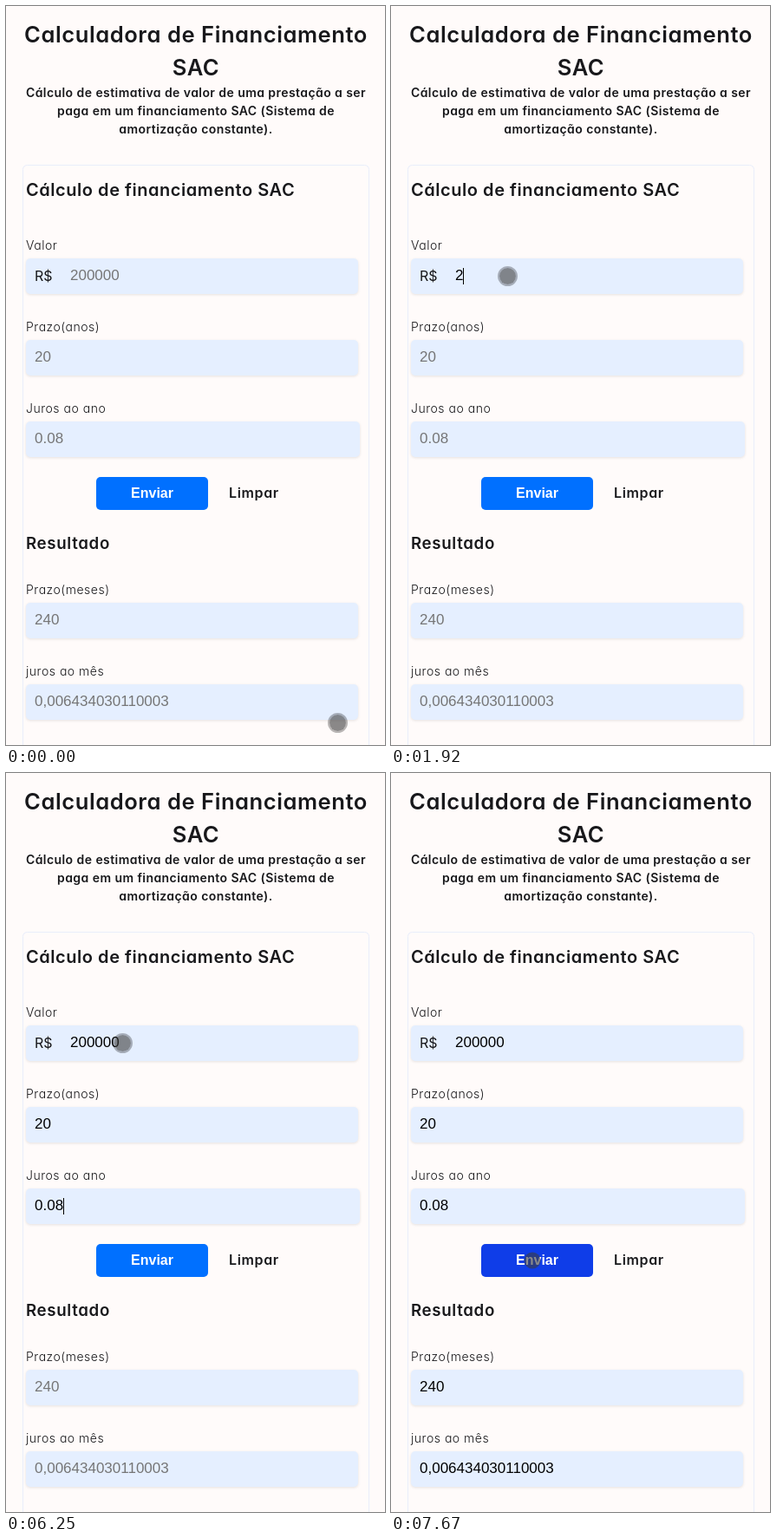
Animation, 437 px wide and 852 px high, one loop 8000 ms. Source, as an HTML page:

```html
<!DOCTYPE html>
<html lang="pt">
<head>
<meta charset="utf-8">
<title>Calculadora de Financiamento SAC</title>
<style>
  html, body { margin: 0; width: 100%; height: 100%; overflow: hidden; background: #fffbfa; }
  svg { display: block; width: 437px; height: 852px; }
  text {
    font-family: Inter, "Open Sans", sans-serif; font-weight: 600; fill: #18181b;
    font-optical-sizing: none; font-feature-settings: "cv11"; letter-spacing: .027em;
  }
  .title { font-size: 25.6px; text-anchor: middle; letter-spacing: .021em; }
  .sub { font-size: 14px; text-anchor: middle; letter-spacing: .031em; }
  .h2 { font-size: 20px; }
  .h3 { font-size: 18.72px; letter-spacing: .035em; }
  .label { font-size: 14px; font-weight: 350; letter-spacing: .037em; }
  .prefix { font-size: 16px; font-weight: 400; letter-spacing: 0; }
  .limpar { font-size: 16px; letter-spacing: .04em; }
  .value, .enviar {
    font-family: "Liberation Sans", Arial, sans-serif; letter-spacing: 0; font-feature-settings: normal;
  }
  .value { font-size: 17px; font-weight: 400; }
  .enviar { font-size: 16px; font-weight: 700; fill: #fff; text-anchor: middle; }
  .field { fill: #e5efff; filter: drop-shadow(0 1px 1.5px rgba(0, 0, 0, .1)); }
</style>
</head>
<body>
<svg viewBox="0 0 437 852">
  <rect x="19.5" y="183.5" width="399" height="700" rx="5" fill="none" stroke="#e8eefa"/>
  <text class="title" x="219" y="42">Calculadora de Financiamento</text>
  <text class="title" x="219" y="80">SAC</text>
  <text class="sub" x="219" y="105">Cálculo de estimativa de valor de uma prestação a ser</text>
  <text class="sub" x="219" y="126">paga em um financiamento SAC (Sistema de</text>
  <text class="sub" x="219" y="147">amortização constante).</text>
  <text class="h2" x="23" y="219">Cálculo de financiamento SAC</text>
  <g id="fields"></g>
  <text class="prefix" x="33" y="317">R$</text>
  <rect id="button" x="104" y="543" width="129" height="38" rx="5"/>
  <text class="enviar" x="168.5" y="567">Enviar</text>
  <text class="limpar" x="257" y="567">Limpar</text>
  <text class="h3" x="23" y="626">Resultado</text>
  <rect id="caret" width="1" height="19"/>
  <g id="cursor">
    <circle r="9.5" fill="#3c3c3c" fill-opacity=".6"/>
    <circle id="ring" r="10.5" fill="none" stroke="#000" stroke-opacity=".28" stroke-width="2"/>
  </g>
</svg>
<script>
const LOOP = 8000, BLINK = 530, RESULT_AT = 7530;
const $ = id => document.getElementById(id);

function add(tag, attrs, text = '') {
  const el = document.createElementNS('http://www.w3.org/2000/svg', tag);
  for (const key in attrs) el.setAttribute(key, attrs[key]);
  el.textContent = text;
  $('fields').append(el);
  return el;
}

const fields = [
  ['Valor', 291, '200000', 74],
  ['Prazo(anos)', 385, '20', 33],
  ['Juros ao ano', 479, '0.08', 33, 385],
  ['Prazo(meses)', 688, '240', 33],
  ['juros ao mês', 782, '0,006434030110003', 33]
].map(([label, top, hint, x, width = 383]) => {
  add('text', { class: 'label', x: 23, y: top - 10 }, label);
  add('rect', { class: 'field', x: 23, y: top, width, height: 41, rx: 5 });
  return { top, hint, x, el: add('text', { class: 'value', x, y: top + 25 }) };
});

// time, focused field, typed text
const typing = [
  [0, -1, ''], [990, 0, ''],
  [1920, 0, '2'], [2380, 0, '20'], [2580, 0, '200'],
  [3050, 0, '2000'], [3170, 0, '20000'], [3370, 0, '200000'],
  [3570, 1, ''], [4200, 1, '2'], [4300, 1, '20'],
  [4500, 2, ''], [5300, 2, '0'], [5630, 2, '0.'], [5850, 2, '0.0'], [6250, 2, '0.08'],
  [7310, -1, '']
];

// tick, x, y
const path = [
  [0, 382.5, 826.5], [6, 135.5, 314.5], [12, 135.5, 314.5], [13, 134.5, 311.5],
  [102, 134.5, 311.5], [104, 172, 325], [105, 186, 420], [106, 181, 515],
  [107, 174, 555], [108, 171, 562], [113, 163, 562], [120, 163, 562]
];

const clamp = v => Math.min(1, Math.max(0, v));
const mix = (a, b, p) => a + (b - a) * p;
const textWidth = s => [...s].reduce((w, c) => w + 17 * (c === '.' ? .278 : .556), 0);

function drawFields(t) {
  const values = ['', '', '', '', ''];
  let current;
  for (const step of typing) {
    if (step[0] > t) break;
    current = step;
    if (step[1] >= 0) values[step[1]] = step[2];
  }
  if (t >= RESULT_AT) for (const i of [3, 4]) values[i] = fields[i].hint;
  fields.forEach((f, i) => {
    f.el.textContent = values[i] || f.hint;
    f.el.style.fill = values[i] ? '#000' : '#757575';
  });

  const [since, focus, text] = current;
  const visible = focus >= 0 && (t - since) % (2 * BLINK) < BLINK;
  $('caret').style.display = visible ? '' : 'none';
  if (visible) {
    $('caret').setAttribute('x', Math.floor(fields[focus].x + textWidth(text)));
    $('caret').setAttribute('y', fields[focus].top + 11);
  }
}

function drawCursor(t) {
  // the pointer moves at 15 steps per second
  const tick = Math.floor((t + 21) * 15 / 1000);
  const next = Math.max(1, path.findIndex(p => p[0] > tick));
  const a = path[next - 1], b = path[next];
  let p = clamp((tick - a[0]) / (b[0] - a[0]));
  if (next === 1) p = p * p * (3 - 2 * p);
  const x = mix(a[1], b[1], p), y = mix(a[2], b[2], p);
  $('cursor').setAttribute('transform', `translate(${x} ${y})`);
  // the ring disappears over the button
  $('ring').style.display = y > 543 && y < 581 && x > 104 && x < 233 ? 'none' : '';
}

function drawButton(t) {
  const p = clamp((t - 7470) / 200);
  $('button').setAttribute('fill', `rgb(${mix(0, 15, p)}, ${mix(112, 61, p)}, ${mix(255, 232, p)})`);
}

const start = performance.now();
function frame() {
  const t = (performance.now() - start) % LOOP;
  drawFields(t);
  drawCursor(t);
  drawButton(t);
  requestAnimationFrame(frame);
}
frame();
</script>
</body>
</html>
```
